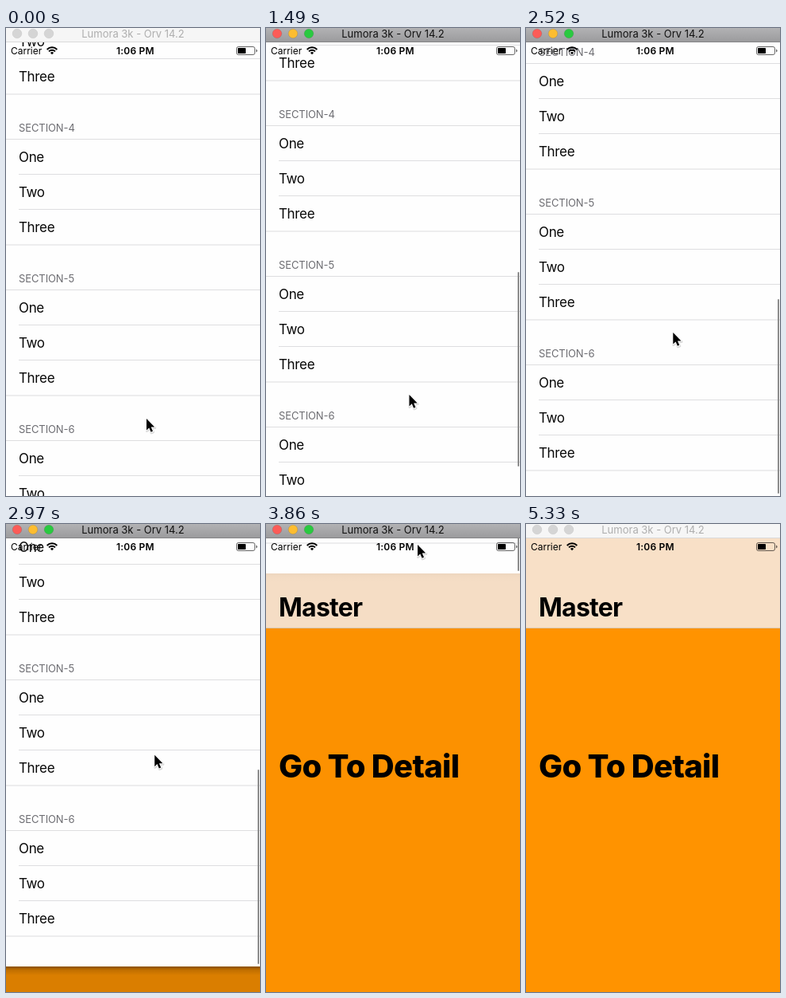
Recreate the animation shown at these times as an HTML page. Size 320 by 587 pixels, loop 5430 ms.

```html
<!DOCTYPE html>
<html lang="en">
<head>
<meta charset="utf-8">
<title>Pull to dismiss</title>
<style>
html, body { margin: 0; width: 100%; height: 100%; overflow: hidden; background: #fff; }
svg { display: block; width: 100%; height: 100%; font-family: Inter, "Liberation Sans", sans-serif; }
.row { font-size: 17px; letter-spacing: -.35px; fill: #080808; }
.head { font-size: 13px; letter-spacing: -.1px; fill: #6d6d72; }
.line { fill: #dedee0; }
.small { font-size: 12px; }
.time { font-size: 12px; font-weight: 600; letter-spacing: .2px; }
.master { font-size: 32px; font-weight: 650; letter-spacing: -.75px; }
.detail { font-size: 40px; font-weight: 800; letter-spacing: -.7px; }
.title { font-size: 13px; text-anchor: middle; }
</style>
</head>
<body>
<svg viewBox="0 0 320 587">
  <defs>
    <clipPath id="screen"><rect y="18" width="320" height="569"/></clipPath>
    <linearGradient id="active" x2="0" y2="1">
      <stop stop-color="#b2b2b4"/><stop offset="1" stop-color="#9a9a9c"/>
    </linearGradient>
    <linearGradient id="fade" x2="0" y2="1">
      <stop stop-opacity=".4"/><stop offset=".4" stop-opacity=".13"/><stop offset="1" stop-opacity="0"/>
    </linearGradient>
    <path id="arrow" d="M0 0V14.5L3.3 11.4L5.6 16.8L8 15.8L5.7 10.5H10.2Z" stroke-linejoin="round"/>
  </defs>

  <g clip-path="url(#screen)">
    <rect y="18" width="320" height="569" fill="#ff9300"/>
    <rect y="18" width="320" height="113" fill="#f8e0c7"/>
    <rect y="130" width="320" height="1" fill="#d9c3ab"/>
    <text class="master" x="16" y="116">Master</text>
    <text class="detail" x="16" y="318">Go To Detail</text>
    <rect id="dim" y="18" width="320" height="569"/>
    <g id="sheet">
      <rect id="shadow" y="587" width="320" height="11" fill="url(#fade)"/>
      <rect y="18" width="320" height="569" fill="#fefefe"/>
      <g id="list"></g>
      <rect id="bar" x="317" width="2" height="244" rx="1" fill="#8c8c8c"/>
    </g>
    <text class="small" x="6" y="32.5">Carrier</text>
    <g fill="none" stroke="#000" stroke-width="2">
      <path d="M51.7 27A8.8 8.8 0 0 1 64.3 27M54 29.4A5.6 5.6 0 0 1 62 29.4"/>
      <path d="M58 33.2L55.9 31A3 3 0 0 1 60.1 31Z" fill="#000" stroke="none"/>
    </g>
    <text class="time" x="139" y="32.5">1:06 PM</text>
    <rect x="290.5" y="23.5" width="23" height="10" rx="2.3" fill="none" stroke="#000" stroke-opacity=".6"/>
    <rect x="292" y="25" width="10" height="7" rx=".7"/>
    <path d="M315 26.5q1.6 .5 1.6 2t-1.6 2Z" fill-opacity=".6"/>
  </g>

  <rect id="chrome" width="320" height="18"/>
  <rect id="edge" y="17" width="320" height="1"/>
  <g id="lights"></g>
  <text id="title" class="title" x="160" y="12">Lumora 3k - Orv 14.2</text>

  <g id="cursor">
    <use href="#arrow" x=".5" y="1" fill="none" stroke="#000" stroke-opacity=".15" stroke-width="3"/>
    <use href="#arrow" stroke="#fff" stroke-width="2" paint-order="stroke"/>
  </g>
</svg>
<script>
const LOOP = 5430, FOCUS = 1050, BLUR = 5330;
const STEP = 148, LEAD = 16; // the screen refreshes once per step
const DRAG = 10, RELEASE = 16, TOP = 19, LEAVE = 20, GONE = 27; // in steps after focus
const MAX_SCROLL = 101, HEIGHT = 569;

const $ = id => document.getElementById(id);
const set = (el, attrs) => { for (const k in attrs) el.setAttribute(k, attrs[k]); };
const clamp = (v, lo, hi) => Math.min(hi, Math.max(lo, v));
const mix = (a, b, s) => a + (b - a) * s;
const span = (k, from, to) => clamp((k - from) / (to - from), 0, 1);
const smooth = s => s * s * (3 - 2 * s);

function add(parent, tag, attrs, text = "") {
  const el = document.createElementNS("http://www.w3.org/2000/svg", tag);
  set(el, attrs);
  el.textContent = text;
  return parent.appendChild(el);
}

const list = $("list");
const rule = (x, y) => add(list, "rect", { class: "line", x, y, width: 320 - x, height: 1 });
for (let n = 3; n <= 6; n++) {
  const top = 139 + (n - 4) * 189;
  add(list, "text", { class: "head", x: 16, y: top - 9.5 }, "SECTION-" + n);
  rule(0, top);
  ["One", "Two", "Three"].forEach((name, i) => {
    add(list, "text", { class: "row", x: 16, y: top + 28.5 + i * 44.2 }, name);
    rule(i < 2 ? 16 : 0, top + 44 * (i + 1) + (i === 2 ? .5 : 0));
  });
}

const colors = ["#fc5b57", "#fdbd30", "#2ac940"];
const lights = colors.map((c, i) =>
  add($("lights"), "circle", { cx: 14 + 20 * i, cy: 7, r: 5.8, "stroke-width": .5 }));

// Slow drag, quick swipe to the top, then away through the bottom edge.
function pointer(k) {
  if (k < 0) return [177, 490];
  if (k > LEAVE) {
    const s = span(k, LEAVE, GONE);
    return [mix(188, 293, s ** 3), mix(26, 600, s ** 1.9)];
  }
  const y = k < DRAG
    ? mix(486, 382, span(k, 0, DRAG) ** 1.15)
    : mix(382, 26, smooth(span(k, DRAG, TOP)));
  return [mix(178, 191, span(k, 0, TOP) ** .9), y];
}

// The sheet follows the pointer until release, then eases out of view.
function liftAt(k) {
  const pulled = Math.max(0, 322 - pointer(Math.min(k, RELEASE))[1]);
  const left = 1 - span(k, RELEASE, RELEASE + 4.6);
  return Math.round(HEIGHT - (HEIGHT - pulled) * left * left);
}

function draw(t) {
  const active = t >= FOCUS && t < BLUR;
  set($("chrome"), { fill: active ? "url(#active)" : "#f6f6f6" });
  set($("edge"), { fill: active ? "#858587" : "#dadada" });
  set($("title"), { fill: active ? "#111" : "#aeaeae" });
  lights.forEach((el, i) => set(el, {
    fill: active ? colors[i] : "#d5d5d5",
    stroke: active ? "rgba(0,0,0,.2)" : "#c4c4c4"
  }));

  const k = t < FOCUS ? -1 : Math.floor((t - FOCUS + LEAD) / STEP);
  const [x, y] = pointer(k);
  const lift = liftAt(k);
  const scroll = k > DRAG ? MAX_SCROLL : Math.round(clamp(477 - y, 0, MAX_SCROLL));
  const rest = 1 - lift / HEIGHT;
  set($("sheet"), { transform: `translate(0 ${-lift})` });
  set($("list"), { transform: `translate(0 ${-scroll})` });
  set($("bar"), { y: Math.min(340, 298.7 + .435 * scroll), opacity: scroll > 0 ? 1 : 0 });
  set($("dim"), { opacity: .155 * rest });
  set($("shadow"), { opacity: rest });
  set($("cursor"), { transform: `translate(${x} ${y})` });
}

const start = performance.now();
function frame() {
  draw((performance.now() - start) % LOOP);
  requestAnimationFrame(frame);
}
frame();
</script>
</body>
</html>
```
